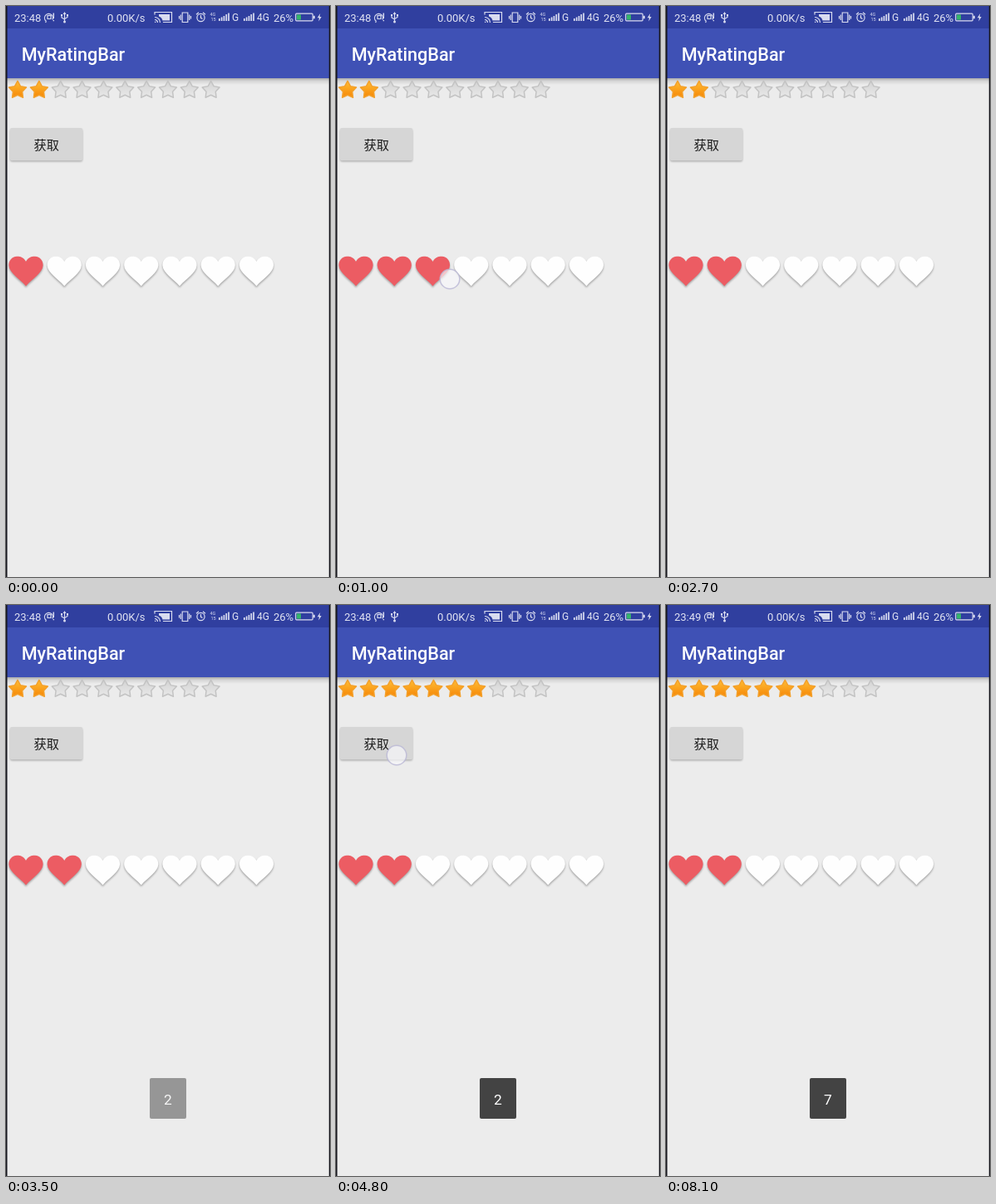
Animation of 390 by 688 pixels, one loop 8800 ms. Source, as an HTML page:

```html
<!DOCTYPE html>
<html lang="zh">
<head>
<meta charset="utf-8">
<title>MyRatingBar</title>
<style>
  html, body { margin: 0; width: 100%; height: 100%; overflow: hidden; background: #ececec; }
  svg { display: block; width: 390px; height: 688px; }
  text { font-family: Roboto, "Noto Sans", sans-serif; fill: #fff; }
  .status { font-size: 13px; fill: #e2e4f3; }
  .line { fill: none; stroke: #d9dcf0; stroke-width: 1.2; }
  .solid { fill: #d9dcf0; }
  .cjk { font: 500 15.2px "Noto Sans CJK SC", "Noto Sans CJK", sans-serif; fill: #1b1b1b; }
  .digit { font-size: 17.4px; text-anchor: middle; }
</style>
</head>
<body>
<svg viewBox="0 0 390 688" xmlns="http://www.w3.org/2000/svg">
  <defs>
    <linearGradient id="gold" x2="0" y2="1">
      <stop stop-color="#ffbe35"/><stop offset="1" stop-color="#f68606"/>
    </linearGradient>
    <linearGradient id="silver" x2="0" y2="1">
      <stop stop-color="#d3d3d3"/><stop offset="1" stop-color="#e9e9e9"/>
    </linearGradient>
    <linearGradient id="shade" x2="0" y2="1">
      <stop stop-opacity=".28"/><stop offset=".4" stop-opacity=".1"/><stop offset="1" stop-opacity="0"/>
    </linearGradient>
    <filter id="soft" x="-20%" y="-20%" width="140%" height="150%">
      <feGaussianBlur stdDeviation="1"/>
    </filter>
    <path id="heart" d="M0 308C-3 302-8 301.5-11 301.7C-17 302-20.8 307-20.6 312.5C-20 322-8 328 0 337.5C8 328 20 322 20.6 312.5C20.8 307 17 302 11 301.7C8 301.5 3 302 0 308Z"/>
    <g id="bars" class="solid">
      <path d="M0 18v-3h1.7v3zM2.8 18v-4.5h1.7v4.5zM5.6 18v-6h1.7v6zM8.4 18v-8h1.7v8zM11.2 18v-9.5h1.7v9.5z"/>
    </g>
  </defs>

  <rect width="390" height="688" fill="#ececec"/>
  <rect y="87" width="390" height="8" fill="url(#shade)"/>
  <rect y="27" width="390" height="60" fill="#3f51b5"/>
  <rect width="390" height="27" fill="#303f9f"/>
  <text x="18.7" y="65.5" font-size="21.6" font-weight="500">MyRatingBar</text>

  <text class="status" id="clock" x="10" y="18.5"></text>
  <g class="line">
    <path d="M48.5 18.5l-1 1.5M48.5 18.5A5 5 0 1 1 56 16.5"/>
    <path d="M50 11.5h4v4h-4z"/>
    <path d="M57.3 8.5v6.5M57.3 17v1.3" stroke-width="1.4"/>
    <path d="M70.5 9v10M67 11.5v2.5l3.5 2M74 11v2.5l-3.5 2"/>
  </g>
  <path class="solid" d="M70.5 7l2 3h-4zM66 10h2v2h-2zM73 10h2v2h-2z"/>
  <circle class="solid" cx="70.5" cy="19" r="1.5"/>
  <text class="status" x="122" y="18.5">0.00K/s</text>

  <g class="line" stroke-width="1.5">
    <path d="M179 10.5V7.5h20.5v12H189"/>
    <path d="M179 16.5a3.5 3.5 0 0 1 3.5 3.5M179 13.5a6.5 6.5 0 0 1 6.5 6.5"/>
  </g>
  <path class="solid" d="M184 10h13v7.5h-8.5q-1-4-4.5-5zM179 18.3l1.8 1.7H179z"/>
  <path class="line" d="M212.2 8h6.6v11.5h-6.6zM210.3 10.5v6.5M220.7 10.5v6.5M208.5 12v3.5M222.5 12v3.5"/>
  <circle class="line" cx="234.5" cy="14" r="4.6"/>
  <path class="line" d="M234.5 11v3.3l2 1.2M229 10.2l3-2.5M240 10.2l-3-2.5"/>
  <g font-size="5.5">
    <text class="solid" x="245.5" y="12">4G</text>
    <text class="solid" x="246.5" y="18.3">15</text>
  </g>
  <use href="#bars" x="256"/>
  <text class="status" x="272" y="18" style="font-size:12px">G</text>
  <use href="#bars" x="286"/>
  <text class="status" x="302" y="18" style="font-size:12px">4G</text>
  <text class="status" x="322" y="18.5">26%</text>
  <rect class="line" x="348.7" y="9.2" width="20.5" height="8.6" rx="1"/>
  <rect x="350" y="10.4" width="5" height="6.2" fill="#35b56a"/>
  <path class="solid" d="M370 11.8h1.8v3.4H370zM378.2 9l-3.4 5.2h2.2l-.7 4.3 3.4-5.4h-2.2z"/>

  <g id="stars" stroke-linejoin="round"></g>

  <rect x="5" y="148.5" width="87" height="39" rx="2" opacity=".28" filter="url(#soft)"/>
  <rect x="5" y="147" width="87" height="39.3" rx="2" fill="#d6d6d6"/>
  <text class="cjk" x="33.5" y="172.5">获取</text>

  <g id="hearts"></g>

  <g id="toast">
    <rect x="173" y="570" width="44" height="49" rx="2" fill="#434343"/>
    <text class="digit" id="before" x="195" y="601.5">2</text>
    <text class="digit" id="after" x="195" y="601.5">7</text>
  </g>

  <circle id="touch" r="11.8" fill="#f7f7fb" fill-opacity=".68" stroke="#b9b6d4" stroke-opacity=".8" stroke-width="1.5"/>
  <path d="M0 0h1.5v688H0zM388.8 0h1.2v688h-1.2z" fill="#15151c"/>
</svg>

<script>
const LOOP = 8800, STEP = 100;
const STAR_GAP = 25.85, HEART_GAP = 46.25;
const $ = id => document.getElementById(id);

function add(parent, tag, attrs) {
  const el = document.createElementNS('http://www.w3.org/2000/svg', tag);
  for (const key in attrs) el.setAttribute(key, attrs[key]);
  return parent.appendChild(el);
}

function starPoints(cx, cy) {
  return Array.from({ length: 10 }, (_, i) => {
    const r = i % 2 ? 5.9 : 11, a = (i / 5 - 0.5) * Math.PI;
    return (cx + r * Math.cos(a)).toFixed(2) + ',' + (cy + r * Math.sin(a)).toFixed(2);
  }).join(' ');
}

const stars = Array.from({ length: 10 }, (_, i) =>
  add($('stars'), 'polygon', { points: starPoints(14 + i * STAR_GAP, 101.4), 'stroke-width': 1.5 }));

const hearts = Array.from({ length: 7 }, (_, i) => {
  const x = 24 + i * HEART_GAP;
  add($('hearts'), 'use', { href: '#heart', x, y: 1.8, opacity: 0.3, filter: 'url(#soft)' });
  return add($('hearts'), 'use', { href: '#heart', x });
});

// Each gesture: points of [ms, x, y]; the finger lifts at the last one.
const heartDrag = [[100, 24, 322], [500, 302, 324], [1000, 137, 329], [1800, 74, 328], [1900, 74, 328]];
const starDrag = [[3900, 16, 108], [4000, 47, 108], [4400, 168, 107], [4600, 172, 107]];
const gestures = [
  heartDrag,
  [[2900, 67, 165], [3200, 67, 165]],
  starDrag,
  [[4800, 73, 181], [5000, 73, 181]]
];

const clamp = v => Math.max(0, Math.min(1, v));
const ramp = (t, from, to) => clamp((t - from) / (to - from));
const smooth = v => v * v * (3 - 2 * v);

function pointAt(path, t) {
  const i = path.findIndex(p => p[0] > t);
  if (i < 1) return null;
  const [a, b] = [path[i - 1], path[i]];
  const k = ramp(t, a[0], b[0]);
  return [a[1] + (b[1] - a[1]) * k, a[2] + (b[2] - a[2]) * k];
}

function rating(path, t, gap, first, last) {
  const p = pointAt(path, t);
  if (p) return Math.max(first, Math.ceil(p[0] / gap));
  return t < path[0][0] ? first : last;
}

function draw(t) {
  $('clock').textContent = t < 8100 ? '23:48' : '23:49';

  const starCount = rating(starDrag, t, STAR_GAP, 2, 7);
  stars.forEach((el, i) => {
    const on = i < starCount;
    el.setAttribute('fill', on ? 'url(#gold)' : 'url(#silver)');
    el.setAttribute('stroke', on ? '#f3a02b' : '#c3c3c3');
  });

  const heartCount = rating(heartDrag, t, HEART_GAP, 1, 2);
  hearts.forEach((el, i) => el.setAttribute('fill', i < heartCount ? '#ec5c63' : '#fefefe'));

  const swap = ramp(t, 6800, 7200);
  $('toast').setAttribute('opacity', smooth(ramp(t, 3200, 3800)) * (1 - 0.16 * swap * (1 - swap)));
  $('before').setAttribute('opacity', 1 - swap);
  $('after').setAttribute('opacity', swap);

  const p = gestures.map(g => pointAt(g, t)).find(Boolean);
  $('touch').setAttribute('visibility', p ? 'visible' : 'hidden');
  if (p) $('touch').setAttribute('transform', `translate(${p})`);
}

const start = performance.now();
function tick() {
  const t = (performance.now() - start) % LOOP;
  draw(Math.floor(t / STEP) * STEP);
  requestAnimationFrame(tick);
}
tick();
</script>
</body>
</html>
```
